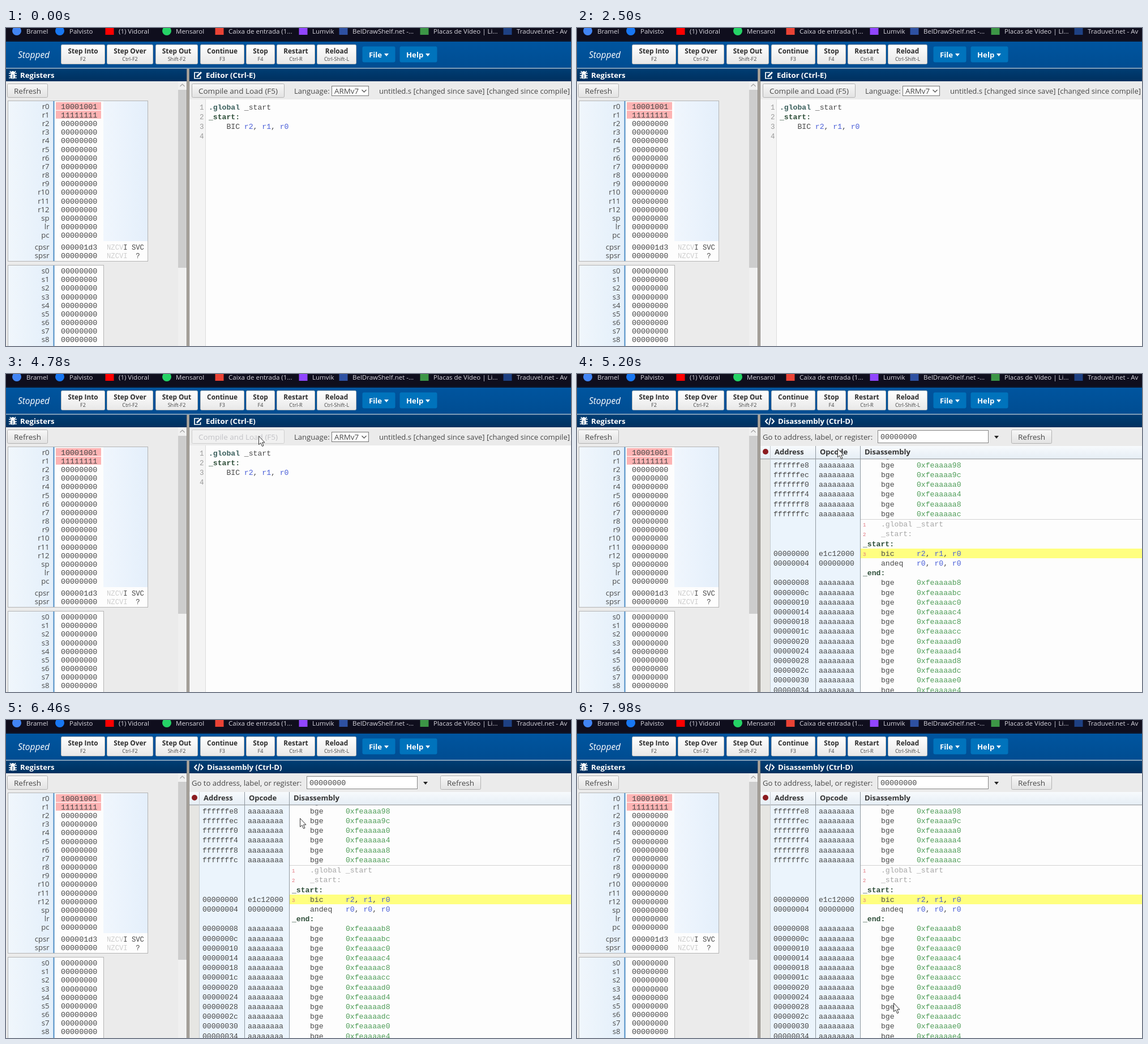
Write an HTML page with a canvas that moves like this. It is 998 px wide and 561 px high and loops after 8 s.

```html
<!DOCTYPE html>
<html lang="en">
<head>
<meta charset="utf-8">
<title>ARM simulator</title>
<style>
html, body { margin: 0; width: 100%; height: 100%; overflow: hidden; background: #ebebeb; }
canvas { display: block; }
</style>
</head>
<body>
<canvas id="stage" width="998" height="561"></canvas>
<script>
const ctx = document.getElementById('stage').getContext('2d');
const W = 998, H = 561, LOOP = 8000;
const PRESSED_AT = 4560, LOADED_AT = 5120;
const SANS = '"Open Sans", sans-serif', MONO = '"Liberation Mono", monospace';
const INK = '#484848', BLUE = '#4a5fd8', GREEN = '#4f9d58', LABEL = '#2f4f3a';
const CODE = '13.1px ' + MONO, VALUE = '13.4px ' + MONO, UI = '13.1px ' + SANS;
const BUTTON = '13.5px ' + SANS, HEADING = 'bold 13.2px ' + SANS;

// [time, x, y] of the pointer tip
const POINTER = [
  [3700, 520, -20], [4200, 446, 109], [4950, 446, 109], [5250, 461, 133],
  [5900, 461, 133], [6350, 519, 173], [7100, 519, 173], [7440, 536, 300], [7900, 559, 499]
];

function text(str, x, y, font, color = INK, align = 'left') {
  ctx.font = font;
  ctx.fillStyle = color;
  ctx.textAlign = align;
  ctx.fillText(str, x, y);
}

function box(x, y, w, h, fill) {
  ctx.fillStyle = fill;
  ctx.fillRect(x, y, w, h);
}

function shade(x0, y0, x1, y1, from, to) {
  const g = ctx.createLinearGradient(x0, y0, x1, y1);
  g.addColorStop(0, from);
  g.addColorStop(1, to);
  return g;
}

function frame(x, y, w, h, color) {
  ctx.strokeStyle = color;
  ctx.lineWidth = 1;
  ctx.strokeRect(x + .5, y + .5, w - 1, h - 1);
}

function rounded(x, y, w, h, r, fill, edge) {
  ctx.beginPath();
  ctx.roundRect(x + .5, y + .5, w - 1, h - 1, r);
  ctx.fillStyle = fill;
  ctx.fill();
  if (!edge) return;
  ctx.strokeStyle = edge;
  ctx.lineWidth = 1;
  ctx.stroke();
}

function shape(points, fill, edge) {
  ctx.beginPath();
  points.forEach(([x, y]) => ctx.lineTo(x, y));
  ctx.closePath();
  ctx.fillStyle = fill;
  ctx.fill();
  if (edge) { ctx.strokeStyle = edge; ctx.lineWidth = 1; ctx.stroke(); }
}

function line(points, color, width) {
  ctx.beginPath();
  points.forEach(([x, y]) => ctx.lineTo(x, y));
  ctx.strokeStyle = color;
  ctx.lineWidth = width;
  ctx.stroke();
}

function dot(x, y, r, fill) {
  ctx.beginPath();
  ctx.arc(x, y, r, 0, 7);
  ctx.fillStyle = fill;
  ctx.fill();
}

const caret = (x, y, color) => shape([[x, y], [x + 8, y], [x + 4, y + 5]], color);

function button(x, w, label, disabled) {
  const fill = disabled ? '#f1f1f1' : shade(0, 98, 0, 123, '#f8f8f8', '#e2e2e2');
  rounded(x, 98, w, 25, 2, fill, disabled ? '#cfcfcf' : '#b2b2b2');
  text(label, x + w / 2, 115.5, BUTTON, disabled ? '#c2c2c6' : INK, 'center');
}

function drawBookmarks() {
  box(0, 0, W, 24, '#0f0e1d');
  const bookmarks = [
    ['Bramel', 36, 19, '#4285f4', true], ['Palvisto', 112, 95, '#1877f2', true],
    ['(1) Vidoral', 199, 183, '#f00', false], ['Mensarol', 300, 284, '#25d366', true],
    ['Caixa de entrada (1...', 393, 377, '#ea4335', false], ['Lumvik', 541, 525, '#9146ff', false],
    ['BelDrawShelf.net -...', 612, 596, '#2e51a2', false],
    ['Placas de Vídeo | Li...', 755, 739, '#3c9646', false], ['Traduvel.net - Av', 902, 886, '#1e4183', false]
  ];
  for (const [label, x, iconX, color, round] of bookmarks) {
    if (round) dot(iconX, 5, 8, color);
    else box(iconX - 7.5, -2, 15, 14, color);
    text(label, x, 10, '11.5px ' + SANS, '#d8d6de');
  }
}

function drawToolbar() {
  box(0, 23, W, 47, shade(0, 23, 0, 70, '#00559f', '#004d92'));
  box(0, 70, W, 2, '#7d9cb8');
  text('Stopped', 21, 53, 'italic 15.5px ' + SANS, '#fff');
  const buttons = [
    [97, 175, 'Step Into', 'F2'], [178, 260, 'Step Over', 'Ctrl-F2'], [264, 339, 'Step Out', 'Shift-F2'],
    [343, 421, 'Continue', 'F3'], [424, 475, 'Stop', 'F4'], [478, 546, 'Restart', 'Ctrl-R'],
    [549, 619, 'Reload', 'Ctrl-Shift-L']
  ];
  for (const [left, right, label, key] of buttons) {
    const mid = (left + right) / 2;
    rounded(left, 29, right - left, 35, 2, shade(0, 29, 0, 64, '#fff', '#e8e8e8'), '#b9b9b9');
    text(label, mid, 45, 'bold 11.8px ' + SANS, '#2c2c2c', 'center');
    text(key, mid, 58, '9px ' + SANS, '#444', 'center');
  }
  for (const [x, w, label, arrowX] of [[629, 59, 'File', 668], [695, 67, 'Help', 741]]) {
    rounded(x, 32, w, 29, 3, '#0073bc');
    text(label, x + 12, 51.5, HEADING, '#fff');
    caret(arrowX, 45, '#fff');
  }
}

function panelHeader(x, w, label, labelX) {
  box(x, 72, w, 22, shade(0, 72, 0, 94, '#003d73', '#00305f'));
  text(label, labelX, 88, HEADING, '#fff');
}

function drawBug() {
  for (const y of [80, 84, 88]) line([[5, y], [19, y]], '#fff', 1.4);
  line([[7, 76], [9, 79]], '#fff', 1.4);
  line([[17, 76], [15, 79]], '#fff', 1.4);
  dot(12, 79, 3, '#fff');
  ctx.beginPath();
  ctx.ellipse(12, 85, 4.5, 5, 0, 0, 7);
  ctx.fill();
  line([[12, 82], [12, 90]], '#00376a', 1);
}

function registerRow(name, value, y, changed) {
  if (changed) box(88, y - 7.3, 80, 14, '#fdb3b3');
  text(name, 76.5, y + 4.7, UI, INK, 'right');
  text(value, 97, y + 4.7, VALUE);
}

function registerBox(y, w, h) {
  box(3, y, w, h, '#fdfdfd');
  box(4, y + 1, 80, h - 2, shade(4, 0, 84, 0, '#f0f6fc', '#e3effa'));
  box(83.5, y + 1, 2, h - 2, '#4d8cc4');
}

function drawRegisters() {
  box(0, 94, 319, H, '#ebebeb');
  panelHeader(0, 319, 'Registers', 25);
  drawBug();
  button(2, 72, 'Refresh');

  const pitch = 15.17, zeros = '00000000';
  registerBox(128, 248, 284);
  box(172, 129, 78, 247, shade(172, 0, 250, 0, '#f0f6fd', '#e4effb'));
  frame(3, 128, 248, 284, '#b4b4b4');
  for (let i = 0; i < 16; i++) {
    const name = i < 13 ? 'r' + i : ['sp', 'lr', 'pc'][i - 13];
    registerRow(name, ['10001001', '11111111'][i] || zeros, 138 + i * pitch, i < 2);
  }
  registerRow('cpsr', '000001d3', 386);
  registerRow('spsr', zeros, 401.2);
  const flags = '12.2px ' + MONO;
  text('NZCV', 178, 390.5, flags, '#cdcdcd');
  text('    I SVC', 178, 390.5, flags);
  text('NZCVI', 178, 405.7, flags, '#cdcdcd');
  text('       ?', 178, 405.7, flags);

  registerBox(418, 170, 150);
  frame(3, 418, 170, 150, '#b4b4b4');
  for (let i = 0; i < 10; i++) registerRow('s' + i, zeros, 428.3 + i * pitch);

  box(304, 94, 15, H, '#f0f0f0');
  box(304, 109, 15, 314, '#cdcdcd');
  line([[307.5, 103], [311.5, 99], [315.5, 103]], '#a0a0a0', 1.2);
  box(319, 72, 5, H, '#aaa59e');
  box(319, 72, 1, H, '#87837d');
  box(323, 72, 1, H, '#87837d');
}

function drawEditor(disabled) {
  panelHeader(324, 674, 'Editor (Ctrl-E)', 353);
  line([[341, 78.5], [333, 78.5], [333, 89], [343.5, 89], [343.5, 85]], '#fff', 1.7);
  line([[337, 86], [345, 78]], '#fff', 3);
  box(324, 94, 674, 32, '#ebebeb');
  button(328, 164, 'Compile and Load (F5)', disabled);
  text('Language:', 509, 115.5, UI);
  box(575, 102, 66, 18, '#fff');
  frame(575, 102, 66, 18, '#777');
  text('ARMv7', 580, 115.5, '13.4px ' + SANS);
  line([[628.5, 109], [632.5, 113], [636.5, 109]], '#555', 1.3);
  text('untitled.s [changed since save] [changed since compile]', 659, 115.5, UI);

  box(324, 126, 674, H, '#fdfdfd');
  box(324, 126, 28, H, '#f4f4f4');
  box(352, 126, 1, H, '#dcdcdc');
  for (let n = 1; n <= 4; n++) text(n, 349.5, 126.7 + n * 17.15, '12.5px ' + MONO, '#9a9a9a', 'right');
  const bold = 'bold ' + CODE;
  text('.global', 358, 143.8, bold, '#3a5f5c');
  text('        _start', 358, 143.8, CODE);
  text('_start:', 358, 161, bold, LABEL);
  text('    BIC   ,   ,', 358, 178.2, CODE);
  text('        r2  r1  r0', 358, 178.2, CODE, BLUE);
}

const hex = n => (n >>> 0).toString(16).padStart(8, '0');

function registersList(y, a, b, c) {
  text('  ,   ,', 600, y, CODE);
  text(`${a}  ${b}  ${c}`, 600, y, CODE, BLUE);
}

function drawListing() {
  const rowY = row => 164.8 + row * 17.2 + (row > 5 ? 1.1 : 0);
  const address = (row, value, opcode) => {
    text(hex(value), 347, rowY(row), CODE);
    text(opcode, 427, rowY(row), CODE);
  };
  const branch = (row, value) => {
    address(row, value, 'aaaaaaaa');
    text('bge', 537, rowY(row), CODE);
    text('0x' + hex(value + 0xfeaaaab0), 600, rowY(row), CODE, GREEN);
  };
  const lineNumber = (row, n) => text(n, 505, rowY(row), '9px ' + MONO, '#e0707a');

  for (let row = -1; row < 6; row++) branch(row, -24 + row * 4);
  for (let row = 12; row < 25; row++) branch(row, 8 + (row - 12) * 4);

  box(501, 256, 497, 1, '#d2d2d2');
  box(501, 308, 497, 17, '#ffff80');
  ['.global _start', '_start:'].forEach((source, i) => {
    lineNumber(6 + i, i + 1);
    text(source, 537, rowY(6 + i), CODE, '#a6a6a6');
  });
  lineNumber(9, 3);
  text('_start:', 505, rowY(8), 'bold ' + CODE, LABEL);
  text('_end:', 505, rowY(11), 'bold ' + CODE, LABEL);
  address(9, 0, 'e1c12000');
  text('bic', 537, rowY(9), CODE);
  registersList(rowY(9), 'r2', 'r1', 'r0');
  address(10, 4, '00000000');
  text('andeq', 537, rowY(10), CODE);
  registersList(rowY(10), 'r0', 'r0', 'r0');
}

function drawDisassembly() {
  panelHeader(324, 674, 'Disassembly (Ctrl-D)', 355);
  line([[337, 79], [333, 83.5], [337, 88]], '#fff', 2);
  line([[344, 79], [348, 83.5], [344, 88]], '#fff', 2);
  line([[342, 77], [339, 90]], '#fff', 1.8);
  box(324, 94, 674, 33, '#ebebeb');
  text('Go to address, label, or register:', 328, 115.5, UI);
  box(531, 99, 196, 23, '#fff');
  frame(531, 99, 196, 23, '#858585');
  text('00000000', 536, 115.3, VALUE);
  caret(737, 109, '#222');
  button(767, 72, 'Refresh');

  box(324, 127, 674, H, '#fdfdfd');
  box(324, 150, 18, H, '#e6e6e3');
  box(342, 150, 158, H, '#ebf4fc');
  drawListing();
  box(324, 127, 674, 23, shade(0, 127, 0, 149, '#f7fafd', '#e6eef5'));
  box(324, 149, 674, 1.5, '#a9adb1');
  dot(333, 137, 5, '#8b1c20');
  for (const [label, x] of [['Address', 349], ['Opcode', 429], ['Disassembly', 508]])
    text(label, x, 142, 'bold 13px ' + SANS, '#333');
  box(341, 127, 1, H, '#c5cbd0');
  box(421, 127, 1, H, '#8f989f');
  box(500, 127, 1, H, '#8f989f');
}

function drawPointer(time) {
  if (time < POINTER[0][0]) return;
  const next = POINTER.findIndex(([at]) => at > time);
  const to = next < 0 ? POINTER.at(-1) : POINTER[next];
  const from = next < 0 ? to : POINTER[next - 1];
  const p = next < 0 ? 1 : (time - from[0]) / (to[0] - from[0]);
  const ease = p * p * (3 - 2 * p);
  const x = from[1] + (to[1] - from[1]) * ease, y = from[2] + (to[2] - from[2]) * ease;
  const arrow = [[0, 0], [0, 15], [3.5, 12], [6, 18], [8.5, 17], [6, 11.3], [10.5, 11.3]];
  shape(arrow.map(([dx, dy]) => [x + dx + .5, y + dy + .5]), '#fff', '#333');
}

function render(now) {
  const time = now % LOOP;
  if (time < LOADED_AT) drawEditor(time >= PRESSED_AT);
  else drawDisassembly();
  drawRegisters();
  drawToolbar();
  drawBookmarks();
  box(0, 22, W, 1, '#0b1a33');
  drawPointer(time);
  requestAnimationFrame(render);
}
requestAnimationFrame(render);
</script>
</body>
</html>
```
